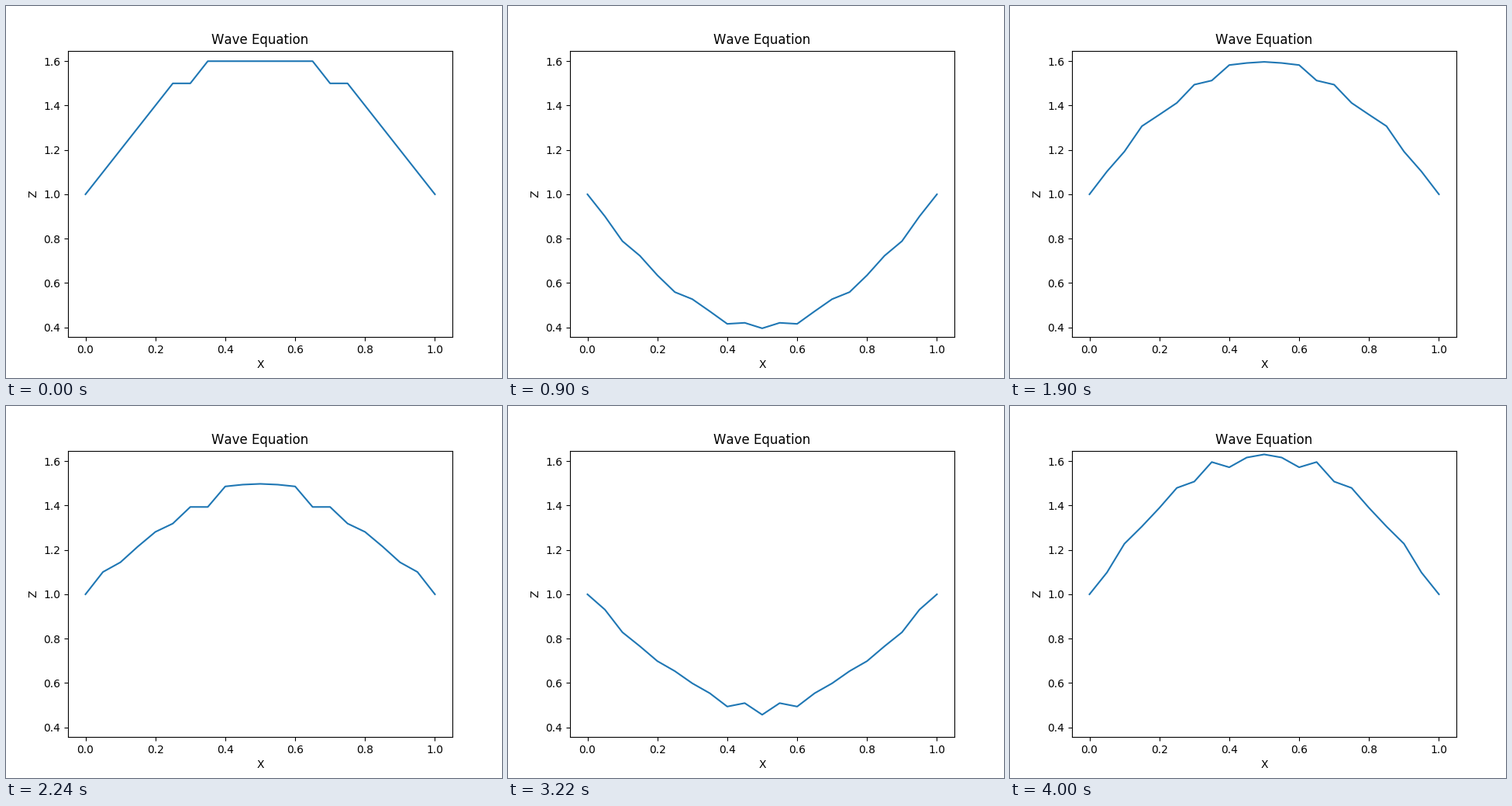
Recreate the animation shown at these times as a matplotlib script. Size 640 by 480 pixels, loop 4020 ms.

```python
import numpy as np
import matplotlib.pyplot as plt
from matplotlib.animation import FuncAnimation

plt.rcParams["text.kerning_factor"] = 6  # plain advance widths, no kerning

STEPS = 201
NODES = 21
DT = 0.02
SPEED = 1.0

x = np.linspace(0, 1, NODES)
courant2 = (SPEED * DT / (x[1] - x[0])) ** 2


def start_shape():
    """Straight rise from both ends, a short ledge, then a flat top."""
    k = np.arange(NODES)
    k = np.minimum(k, k[::-1])
    return 1 + 0.1 * np.minimum(k - (k > 5), 6)


def solve():
    """Leapfrog solution of a string that starts at rest with fixed ends."""
    z = np.empty((STEPS, NODES))
    z[:2] = start_shape()
    for n in range(1, STEPS - 1):
        z[n + 1] = 2 * z[n] - z[n - 1]
        z[n + 1, 1:-1] += courant2 * np.diff(z[n], 2)
    return z


z = solve()

fig, ax = plt.subplots(figsize=(6.4, 4.8), dpi=100)
line, = ax.plot(x, z[0])
ax.set_ylim(z.min(), z.max())
ax.set_title("Wave Equation")
ax.set_xlabel("X")
ax.set_ylabel("Z")


def update(n):
    line.set_ydata(z[n])
    return line,


anim = FuncAnimation(fig, update, frames=STEPS, interval=20,
                     repeat=True, repeat_delay=0)
plt.show()
```
